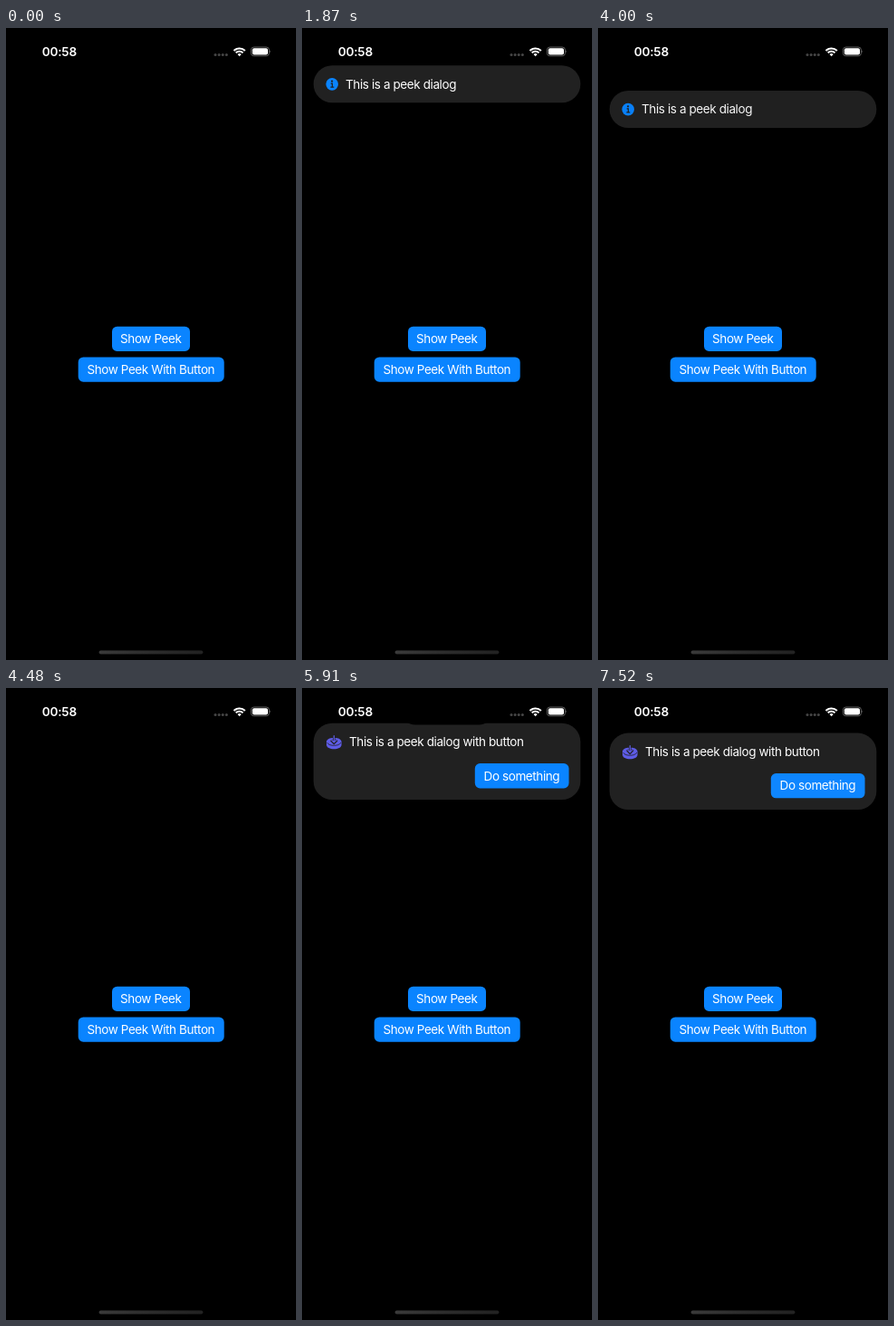
These frames come from a looping animation (320 by 696 pixels, 8 s). An HTML page:

```html
<!DOCTYPE html>
<html lang="en">
<head>
<meta charset="utf-8">
<style>
  html, body { margin: 0; width: 100%; height: 100%; overflow: hidden; background: #000; }
  svg { display: block; width: 320px; height: 696px; }
  text { font: 13.5px Inter, "Liberation Sans", sans-serif; letter-spacing: -.4px; fill: #fff; }
  .time { font-weight: 600; font-size: 13.6px; letter-spacing: -.2px; }
  .btn rect { fill: #0a84ff; }
  .btn text { text-anchor: middle; }
  .card > rect { fill: #212121; }
</style>
</head>
<body>
<svg viewBox="0 0 320 696">
  <defs>
    <linearGradient id="bar" x2="1" y2="0">
      <stop stop-color="#3a3a3a"/><stop offset=".5" stop-color="#2c2c2c"/><stop offset="1" stop-color="#222"/>
    </linearGradient>
  </defs>
  <rect width="320" height="696"/>

  <g class="btn" id="show">
    <rect x="117" y="328.7" width="86" height="27.3" rx="5.6"/>
    <text x="159.8" y="347.2">Show Peek</text>
  </g>
  <g class="btn">
    <rect x="79.7" y="362.4" width="161" height="27.3" rx="5.6"/>
    <text x="159.8" y="380.9">Show Peek With Button</text>
  </g>

  <g class="card" id="peek">
    <rect x="12.7" width="294.6" height="41.2" rx="20.6"/>
    <circle cx="33.2" cy="20.7" r="6.8" fill="#0a84ff"/>
    <circle cx="33.1" cy="17.4" r="1.15" fill="#212121"/>
    <path d="M31.7 19.9h1.7v4M31.4 24h3.9" fill="none" stroke="#212121" stroke-width="1.2"/>
    <text x="48" y="25.5">This is a peek dialog</text>
  </g>

  <g class="card" id="peek2">
    <rect x="12.7" width="294.6" height="84.4" rx="20.6"/>
    <g fill="#5e5ce6">
      <path d="M27 20.6C27 17.5 31 16.3 34 16.2V20.3H36.6V16.2C39.6 16.3 43.6 17.5 43.6 20.6V23.6C43.6 27.2 39.5 28.6 35.3 28.6S27 27.2 27 23.6Z"/>
      <path d="M27.7 21.4C29 24 32.5 24.6 35.3 24.6S41.6 24 42.9 21.4" fill="none" stroke="#212121" stroke-width=".8"/>
      <path d="M32 18.6L35.3 22L38.6 18.6" fill="none" stroke="#212121" stroke-width="2.6"/>
      <path d="M35.3 14V21M32.7 18.6L35.3 21.2L37.9 18.6" fill="none" stroke="#5e5ce6" stroke-width="1.2" stroke-linecap="round"/>
    </g>
    <text x="52" y="25.5">This is a peek dialog with button</text>
    <g class="btn" id="act">
      <rect x="190.8" y="44.4" width="103.7" height="27.3" rx="5.6"/>
      <text x="242.4" y="62.9">Do something</text>
    </g>
  </g>

  <rect x="110.3" y="11.1" width="99.5" height="29.5" rx="14.75"/>
  <text class="time" x="39.7" y="30.9">00:58</text>
  <g fill="#464646">
    <circle cx="231" cy="29.5" r="1.5"/><circle cx="235.1" cy="29.5" r="1.5"/>
    <circle cx="239.2" cy="29.5" r="1.5"/><circle cx="243.3" cy="29.5" r="1.5"/>
  </g>
  <g fill="none" stroke="#fff" stroke-width="2">
    <path d="M251.4 25A8.9 8.9 0 0 1 263.8 25M253.7 27.4A5.6 5.6 0 0 1 261.5 27.4"/>
    <path d="M257.6 31.2L255.5 29.1A3 3 0 0 1 259.7 29.1Z" fill="#fff" stroke="none"/>
  </g>
  <rect x="270.4" y="21" width="20" height="9.8" rx="3.2" fill="none" stroke="#777" stroke-width=".8"/>
  <rect x="271.8" y="22.3" width="17.2" height="7.2" rx="2" fill="#fff"/>
  <path d="M291.4 24.3Q292.6 25.9 291.4 27.5Z" fill="#777"/>
  <rect x="102.6" y="685.6" width="114.8" height="4" rx="2" fill="url(#bar)"/>
</svg>
<script>
const $ = id => document.getElementById(id);
const REST = 49.6;

// Share of the way still to go for a critically damped spring after ms.
const left = (ms, rate) => {
  const x = Math.max(0, ms) / 1000 * rate;
  return (1 + x) * Math.exp(-x);
};

const mix = (a, b, k) => `rgb(${a.map((v, i) => v + (b[i] - v) * k)})`;

function press(id, t, down, up) {
  const k = t < down ? 0 : t < up ? 1 : Math.max(0, 1 - (t - up) / 240);
  const [box, label] = $(id).children;
  box.style.fill = mix([10, 132, 255], [59, 157, 255], k);
  label.style.fill = mix([255, 255, 255], [196, 225, 255], k);
}

function place(id, y, alpha) {
  $(id).setAttribute("transform", `translate(0 ${y})`);
  $(id).setAttribute("opacity", alpha);
}

function draw(t) {
  press("show", t, 1350, 1430);
  press("act", t, 7130, 7300);

  const gone = 1 - left(t - 3950, 14);
  const fade = t < 4480 ? 1 - gone ** 2 : 0;
  place("peek", REST - 90 * left(t - 1430, 9) + 120 * gone, t < 1430 ? 0 : fade);
  place("peek2", REST - 134 * left(t - 5450, 9), t < 5450 ? 0 : 1);
}

function tick(now) {
  draw(now % 8000);
  requestAnimationFrame(tick);
}
requestAnimationFrame(tick);
</script>
</body>
</html>
```
